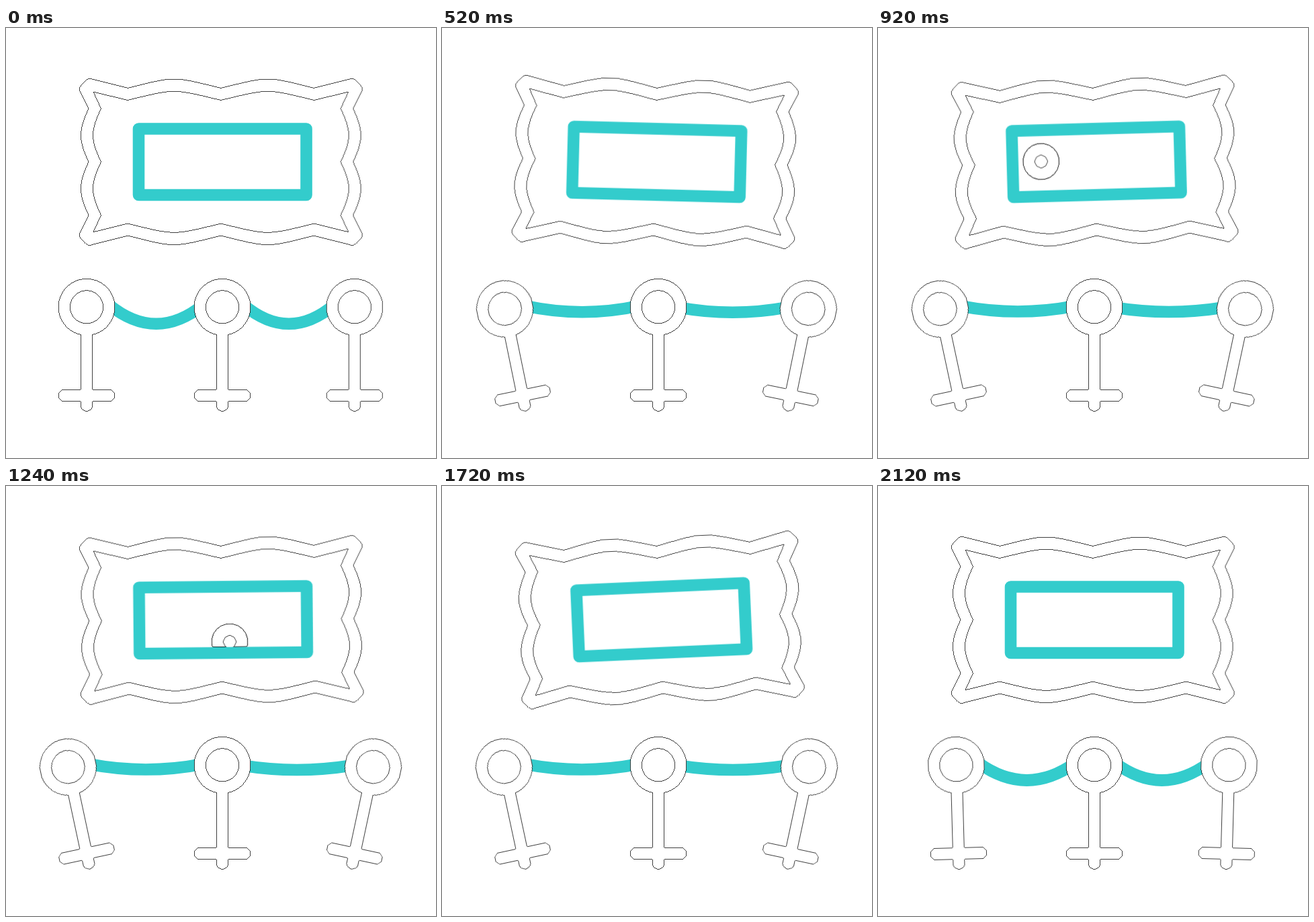
These frames come from a looping animation (640 px wide and 640 px high, 2160 ms). An HTML page:

```html
<!DOCTYPE html>
<html lang="en">
<head>
<meta charset="utf-8">
<title>Gallery</title>
<style>
  html, body { margin: 0; width: 100%; height: 100%; overflow: hidden; background: #fff; }
  svg { display: block; width: 100vw; height: 100vh; }

  /* Thin, unsmoothed outlines that break up slightly */
  .line { stroke: #000; stroke-width: .75; shape-rendering: crispEdges; }
  .teal { fill: none; stroke: #3cc; stroke-width: 17.6; stroke-linejoin: round; }

  .picture, .post, .rope, .across, .drop {
    animation-duration: 2160ms;
    animation-iteration-count: infinite;
    animation-timing-function: cubic-bezier(.37, 0, .63, 1);
  }

  /* Picture swinging from its top edge */
  .picture { transform-origin: 320px 99px; animation-name: swing; }
  @keyframes swing {
    0% { transform: rotate(0deg); }
    15.74% { transform: rotate(-2.3deg); }
    30.79% { transform: rotate(4.1deg); }
    49.77% { transform: rotate(-4.1deg); }
    65.28% { transform: rotate(3.2deg); }
    76.85% { transform: rotate(-2.7deg); }
    94.21%, 100% { transform: rotate(0deg); }
  }

  /* Posts lean apart, then return */
  .post { transform-origin: 0 0; }
  .west { animation-name: leanWest; }
  .east { animation-name: leanEast; }
  @keyframes leanWest {
    0%, 100% { transform: rotate(0deg); }
    27.78% { transform: rotate(-12.1deg); }
    84.72% { transform: rotate(-12.1deg); animation-timing-function: cubic-bezier(.4, 0, .8, .85); }
  }
  @keyframes leanEast {
    0%, 100% { transform: rotate(0deg); }
    27.78% { transform: rotate(12.1deg); }
    84.72% { transform: rotate(12.1deg); animation-timing-function: cubic-bezier(.4, 0, .8, .85); }
  }

  /* Ropes tighten with the posts */
  .ropeWest { animation-name: pullWest; }
  .ropeEast { animation-name: pullEast; }
  @keyframes pullWest {
    0%, 100% { d: path("M153.5 412Q223.5 468.6 293.5 412"); }
    27.78% { d: path("M124 414Q208 430 292 414"); }
    84.72% { d: path("M124 414Q208 430 292 414"); animation-timing-function: cubic-bezier(.4, 0, .8, .85); }
  }
  @keyframes pullEast {
    0%, 100% { d: path("M353.5 412Q421 468.6 488.5 412"); }
    27.78% { d: path("M352 416Q433 429 514 416"); }
    84.72% { d: path("M352 416Q433 429 514 416"); animation-timing-function: cubic-bezier(.4, 0, .8, .85); }
  }

  /* Ring crossing the canvas */
  .across { animation-name: across; animation-timing-function: linear; }
  .drop { animation-name: drop; }
  @keyframes across {
    0%, 31.48% { transform: translateX(171px); }
    79.63%, 100% { transform: translateX(469px); }
  }
  @keyframes drop {
    0%, 33.33% { transform: translateY(179.5px); }
    57.41%, 100% { transform: translateY(232px); }
  }
</style>
</head>
<body>
<svg viewBox="0 0 640 640">
  <defs>
    <g id="quarter" class="line" fill="none">
      <path d="M123 199.3C107.7 166.7 107.7 152.6 123 120L110 94Q107.5 89 111 85.5L118.5 77.5Q121.5 74.3 125.5 75.6L181 89.5C253 71.5 247 71.5 319.8 89.5"/>
      <path d="M141.5 199.3C125.5 165.3 125.5 154 141.5 120L130 95L181 107.5C253 90 247 90 319.8 107.5"/>
    </g>
    <g id="half">
      <use href="#quarter"/>
      <use href="#quarter" transform="translate(0 398.6) scale(1 -1)"/>
    </g>
    <g id="post" class="line" fill="#fff">
      <path d="M-8.8-90.6V-8.8H-33.2A8.8 8.8 0 0 0-33.2 8.8H-8.8V14.5A8.8 8.8 0 0 0 8.8 14.5V8.8H33.2A8.8 8.8 0 0 0 33.2-8.8H8.8V-90.6A42 42 0 1 0-8.8-90.6Z"/>
      <circle cy="-131.7" r="24.6"/>
    </g>
    <clipPath id="canvas"><path d="M206.3 158.8H438.2V239.7H206.3Z"/></clipPath>
    <clipPath id="canvasInset"><path d="M207.2 159.7H437.3V238.8H207.2Z"/></clipPath>
  </defs>

  <g class="picture">
    <use href="#half"/>
    <use href="#half" transform="translate(639.6 0) scale(-1 1)"/>
    <g clip-path="url(#canvas)">
      <g class="across"><g class="drop">
        <circle r="18" fill="none" stroke="#000" stroke-width="17.6"/>
      </g></g>
    </g>
    <g clip-path="url(#canvasInset)">
      <g class="across"><g class="drop">
        <circle class="line" r="26.8" fill="#fff"/>
        <circle class="line" r="9.3" fill="#fff"/>
      </g></g>
    </g>
    <rect class="teal" x="197.5" y="150" width="249.5" height="98.5"/>
  </g>

  <path class="teal rope ropeWest" d="M153.5 412Q223.5 468.6 293.5 412"/>
  <path class="teal rope ropeEast" d="M353.5 412Q421 468.6 488.5 412"/>

  <g transform="translate(120 547)"><g class="post west"><use href="#post"/></g></g>
  <g transform="translate(322 547)"><use href="#post"/></g>
  <g transform="translate(518.8 547)"><g class="post east"><use href="#post"/></g></g>
</svg>
</body>
</html>
```
